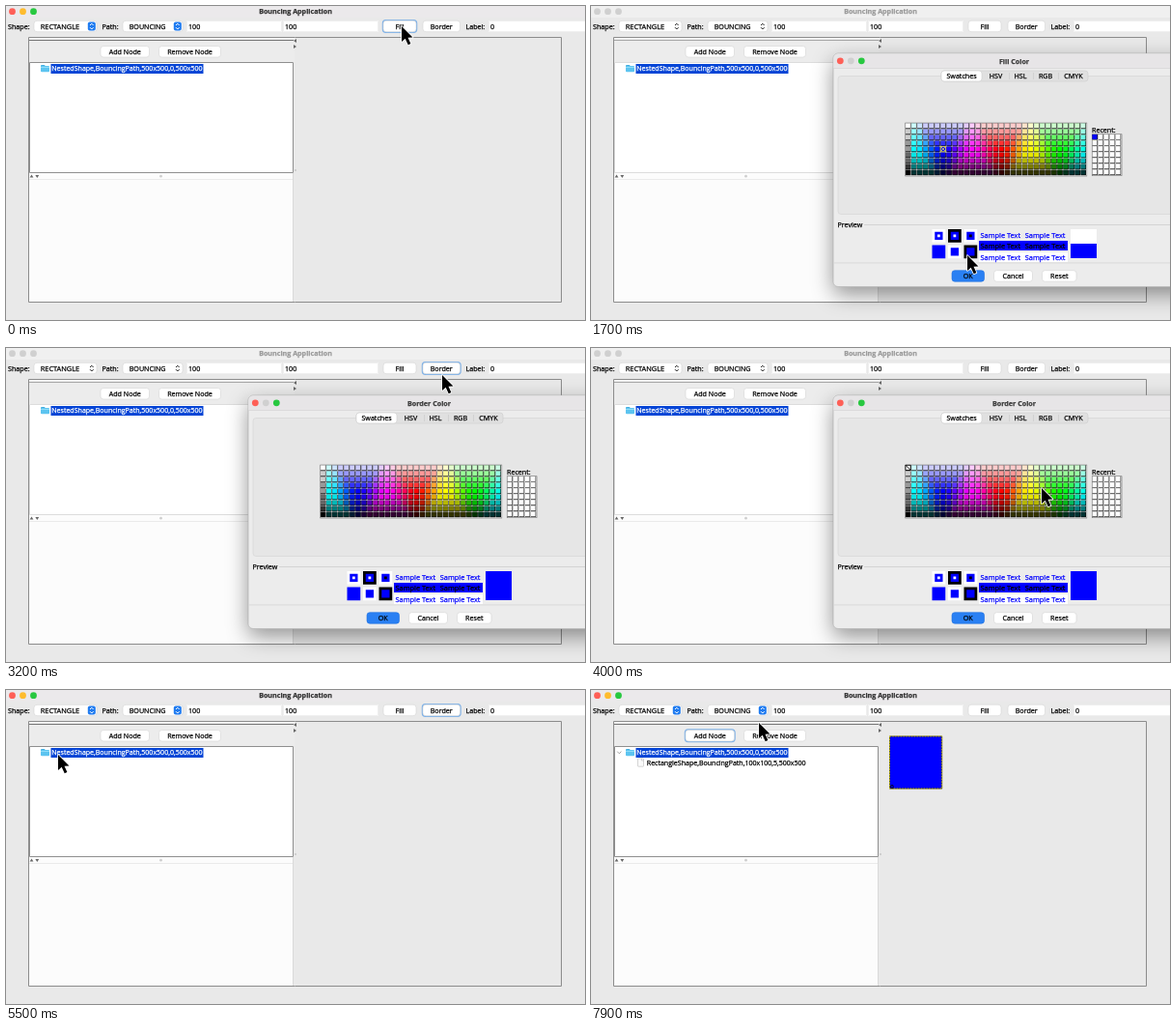
An HTML page with a canvas that plays this animation: 600x325 px, repeating every 8000 ms.

```html
<!DOCTYPE html>
<html lang="en">
<head>
<meta charset="utf-8">
<title>Bouncing Application</title>
<style>
html, body { margin: 0; width: 100%; height: 100%; overflow: hidden; background: #e9e9e9; }
canvas { display: block; width: 600px; height: 325px; }
</style>
</head>
<body>
<canvas id="stage" width="600" height="325"></canvas>
<script>
const ctx = document.getElementById('stage').getContext('2d');
const LOOP = 8000, STEP = 100;
const UI = 0.55; // interface units to stage pixels
const FILL_DIALOG = { title: 'Fill Color', open: 500, close: 2000, pick: 1200, old: '#fff', color: '#00f', cell: [6, 4] };
const BORDER_DIALOG = { title: 'Border Color', open: 3100, close: 4800, pick: 4300, old: '#00f', color: '#ff0', cell: [21, 4] };
const BORDER_CLICK = 2900, ADD_CLICK = 6200;

// Pointer stops: time, x, y
const POINTER = [
  [0, 410, 21], [700, 410, 21], [1150, 365, 149], [1300, 365, 149],
  [1700, 390, 258], [1800, 390, 275], [2000, 390, 278], [2600, 447, 46],
  [2800, 452, 28], [3600, 452, 28], [4000, 467, 145], [4200, 455, 148],
  [4300, 455, 148], [4500, 400, 262], [4700, 391, 284], [5300, 391, 284],
  [5500, 54, 67], [5600, 54, 67], [6000, 122, 46], [6250, 122, 46],
  [6500, 235, 71], [6900, 384, 110], [7050, 384, 112], [7400, 424, 81], [7900, 174, 34]
];

function rect(x, y, w, h, color) {
  ctx.fillStyle = color;
  ctx.fillRect(x, y, w, h);
}

function frame(x, y, w, h, color) {
  ctx.strokeStyle = color;
  ctx.lineWidth = 1;
  ctx.strokeRect(x + 0.5, y + 0.5, w - 1, h - 1);
}

function round(x, y, w, h, r, fill, stroke, width = 0.6) {
  ctx.beginPath();
  ctx.roundRect(x, y, w, h, r);
  if (fill) { ctx.fillStyle = fill; ctx.fill(); }
  if (stroke) { ctx.strokeStyle = stroke; ctx.lineWidth = width; ctx.stroke(); }
}

function dot(x, y, r, color) {
  ctx.fillStyle = color;
  ctx.beginPath();
  ctx.arc(x, y, r, 0, Math.PI * 2);
  ctx.fill();
}

function poly(points, fill) {
  ctx.beginPath();
  points.forEach(([x, y]) => ctx.lineTo(x, y));
  ctx.closePath();
  ctx.fillStyle = fill;
  ctx.fill();
}

function line(points, color, width) {
  ctx.beginPath();
  points.forEach(([x, y]) => ctx.lineTo(x, y));
  ctx.strokeStyle = color;
  ctx.lineWidth = width;
  ctx.stroke();
}

// y is the vertical middle of the line; a hairline stroke gives a medium weight
function text(str, x, y, { color = '#000', align = 'left', size = 7.15, bold = false } = {}) {
  ctx.font = `${bold ? 'bold ' : ''}${size}px "Open Sans", "Noto Sans", sans-serif`;
  ctx.fillStyle = ctx.strokeStyle = color;
  ctx.lineWidth = 0.25;
  ctx.lineJoin = 'round';
  ctx.textAlign = align;
  ctx.textBaseline = 'alphabetic';
  ctx.fillText(str, x, y + 2.6);
  ctx.strokeText(str, x, y + 2.6);
}

function button(label, x, y, w, { focused = false, primary = false } = {}) {
  if (focused) round(x - 0.3, y - 0.3, w + 0.6, 12.1, 3, null, '#7fb2e8', 1.9);
  round(x, y, w, 11.5, 3, primary ? '#2a80f3' : '#fff', primary ? '#1d6fe0' : '#d4d4d4');
  text(label, x + w / 2, y + 5.8, { align: 'center' });
}

function combo(label, x, w, active, size) {
  round(x, 15.3, w, 11.4, 3, '#fff', '#d4d4d4');
  text(label, x + 6.7, 21, { size });
  const cx = x + w - 5.2;
  if (active) round(cx - 4, 16.6, 8, 8.8, 2, '#1f7bf0');
  const arrow = active ? '#fff' : '#222';
  line([[cx - 1.8, 20], [cx, 18.2], [cx + 1.8, 20]], arrow, 1);
  line([[cx - 1.8, 22.2], [cx, 24], [cx + 1.8, 22.2]], arrow, 1);
}

function field(x, w, value) {
  rect(x, 15, w, 12, '#fff');
  frame(x, 15, w, 12, '#efefef');
  text(value, x + 2, 21);
}

function titleBar(active) {
  rect(0, 0, 600, 12, active ? '#ebe9eb' : '#f0f0f0');
  const lights = active ? ['#fe5f57', '#febc2e', '#28c840'] : ['#d0d0d0', '#d0d0d0', '#d0d0d0'];
  lights.forEach((color, i) => dot(6.5 + i * 11, 5.7, 3.4, color));
  text('Bouncing Application', 300, 5.8, { bold: true, align: 'center', color: active ? '#333' : '#9a9a9a' });
}

function toolbar(active, focus) {
  text('Shape:', 2, 21);
  combo('RECTANGLE', 29, 65, active, 7.4);
  text('Path:', 99.5, 21);
  combo('BOUNCING', 121, 62, active);
  field(187, 99, '100');
  field(287, 99, '100');
  button('Fill', 391, 15.2, 34, { focused: focus === 'fill' });
  button('Border', 432, 15.2, 38.5, { focused: focus === 'border' });
  text('Label:', 476.5, 21);
  field(500, 102, '0');
}

function tree(added, active) {
  rect(24, 58, 274, 115, '#fff');
  frame(24, 58, 274, 115, active ? '#8f8f8f' : '#dcdcdc');
  round(36, 61, 4.5, 3, 1, '#42aee0');
  round(36, 62, 9, 6.3, 1, '#5cc4f0');
  rect(36, 63, 9, 1, '#8fdcf8');
  rect(46.5, 60, 158, 10, '#0645d6');
  text('NestedShape,BouncingPath,500x500,0,500x500', 47.3, 64.7, { color: '#fff', size: 7.05 });
  if (!added) return;
  line([[27.2, 63.6], [29.3, 65.8], [31.4, 63.6]], '#8a8a8a', 0.8);
  round(48.5, 70.8, 6, 8.4, 0.5, '#fafafa', '#b9b9b9');
  line([[52.4, 70.8], [52.4, 73], [54.5, 73]], '#b9b9b9', 0.6);
  text('RectangleShape,BouncingPath,100x100,5,500x500', 57.8, 75, { size: 7.05 });
}

function bouncingShape(t) {
  const x = 305 + (t - 6900) * 0.0045, y = 39 + (t - 6900) * 0.0089;
  const size = 100 * UI - 0.8;
  rect(x, y, size, size, '#00f');
  ctx.lineWidth = 0.8;
  ctx.strokeStyle = '#44420a';
  ctx.strokeRect(x, y, size, size);
  ctx.setLineDash([1.4, 1.4]);
  ctx.strokeStyle = '#e6d800';
  ctx.strokeRect(x, y, size, size);
  ctx.setLineDash([]);
  text('0', x + 0.7, y + size - 2.6, { size: 6 });
}

function workspace(t, focus, active) {
  const added = t >= ADD_CLICK;
  frame(23, 32, 553, 275, '#8c8c8c');
  rect(24, 33, 275, 25, '#ececec');
  rect(24, 33, 275, 1, '#f8f8f8');
  rect(24, 35, 274, 1, active ? '#777' : '#a8a8a8');
  button('Add Node', 98, 41.5, 50.5, { focused: focus === 'add' });
  button('Remove Node', 158.5, 41.5, 64);
  tree(added, active);
  rect(24, 173, 274, 133, '#fcfcfc');
  rect(24, 179, 274, 0.8, '#e6e6e6');
  rect(297, 173, 1, 133, '#dadada');
  const gray = '#666';
  poly([[24.6, 177.5], [28.4, 177.5], [26.5, 174.6]], gray);
  poly([[30.4, 175], [34.2, 175], [32.3, 177.9]], gray);
  poly([[301, 34], [301, 38], [298, 36]], gray);
  poly([[298, 40], [298, 44], [301, 42]], gray);
  dot(160.5, 176.2, 1.4, '#cfcfcf');
  dot(300, 170, 0.9, '#c4c4c4');
  if (added) bouncingShape(t);
}

function swatchColor(col, row) {
  if (col === 0) {
    const g = [255, 204, 204, 153, 153, 102, 102, 51, 0][row];
    return `rgb(${g},${g},${g})`;
  }
  const hue = (14 + col) % 30; // five steps per sixth of the wheel
  const depth = Math.max(0, row - 4) / 4;
  const ceiling = 255 - 204 * depth ** 1.5;
  const channel = centre => {
    const gap = Math.abs(hue - centre);
    const level = Math.max(0, Math.min(1, 2 - Math.min(gap, 30 - gap) / 5));
    const base = 255 * level * level * (3 - 2 * level);
    return Math.round(row < 4 ? Math.max(base, 204 - 51 * row) : Math.min(base, ceiling));
  };
  return `rgb(${channel(0)},${channel(10)},${channel(20)})`;
}

function swatchGrid(x, y, cols, rows, colorAt) {
  ctx.save();
  ctx.translate(x, y);
  ctx.scale(UI, UI);
  rect(-1, -1, cols * 11 + 2, rows * 11 + 2, '#666');
  rect(0, 0, cols * 11, rows * 11, '#fff');
  for (let row = 0; row < rows; row++) {
    for (let col = 0; col < cols; col++) {
      rect(col * 11, row * 11, 10, 10, '#000');
      rect(col * 11, row * 11, 9, 9, colorAt(col, row));
    }
  }
  ctx.restore();
}

function marker(col, row) {
  const x = 326 + col * 11 * UI, y = 121.3 + row * 11 * UI;
  const ink = row ? '#e8e060' : '#000';
  ctx.strokeStyle = ink;
  ctx.lineWidth = 0.8;
  ctx.strokeRect(x, y, 5.2, 5.2);
  line([[x, y], [x + 5, y + 5]], ink, 0.9);
  if (row) line([[x + 5, y], [x, y + 5]], ink, 0.9);
}

function preview(old, color) {
  ctx.save();
  ctx.translate(353.5, 231);
  ctx.scale(UI, UI);
  const nested = (col, row, ...colors) => colors.forEach((c, i) =>
    rect(col * 30 + i * 5, row * 30 + i * 5, 25 - i * 10, 25 - i * 10, c));
  nested(0, 0, '#fff', color, '#fff');
  nested(1, 0, '#000', color, '#fff');
  nested(2, 0, '#fff', color, '#000');
  nested(0, 1, color);
  nested(1, 1, '#fff', color);
  nested(2, 1, '#000', color);
  ctx.restore();

  rect(402, 243, 92, 10, color);
  rect(402, 255, 92, 10, '#fff');
  for (let row = 0; row < 3; row++) {
    for (let col = 0; col < 2; col++) {
      text('Sample Text', 403.5 + col * 46.3, 237.3 + row * 11.4,
        { color: row === 1 ? '#000' : color, size: 7.4 });
    }
  }
  rect(497, 231, 27, 15, old);
  rect(497, 246, 27, 15, color);
}

function dialog({ title, open, pick, old, color, cell }, t) {
  const picked = t >= pick;
  ctx.save();
  ctx.shadowColor = 'rgba(0,0,0,0.42)';
  ctx.shadowBlur = 22;
  ctx.shadowOffsetY = 8;
  round(251, 49, 375, 241.5, 5, '#ececec');
  ctx.restore();
  round(251, 49, 375, 241.5, 5, '#ececec', '#a9a9a9');
  round(251.4, 49.4, 374, 15, [5, 5, 0, 0], '#e7e5e7');
  rect(251, 64, 375, 0.6, '#d2d2d2');
  ['#fe5f57', '#d0d0d0', '#28c840'].forEach((c, i) => dot(258.3 + i * 11, 56.8, 3.4, c));
  text(title, 438.5, 57, { bold: true, align: 'center', color: '#3a3a3a' });

  round(256, 72.5, 365, 143, 3, '#e6e6e6', '#d4d4d4');
  round(363, 67, 152, 11, 3, '#e0e0e0', '#cdcdcd');
  round(363, 67, 42, 11, 3, '#fff', '#cdcdcd');
  [['Swatches', 384], ['HSV', 419.5], ['HSL', 445], ['RGB', 471], ['CMYK', 500]]
    .forEach(([label, x]) => text(label, x, 72.5, { align: 'center' }));
  [433, 458, 484].forEach(x => rect(x, 69, 0.6, 7, '#c8c8c8'));

  swatchGrid(326, 121.3, 31, 9, swatchColor);
  if (t > open + STEP) {
    if (picked) marker(...cell);
    else marker(0, 0);
  }
  text('Recent:', 519, 128.3);
  swatchGrid(519.5, 133, 5, 7, (col, row) => picked && col + row === 0 ? color : '#fff');

  text('Preview', 255.5, 226);
  rect(283, 226, 320, 1, '#d4d4d4');
  rect(251.5, 265.6, 350, 0.7, '#cfcfcf');
  preview(old, picked ? color : old);
  button('OK', 374, 273.7, 33.5, { primary: true });
  button('Cancel', 417.5, 273.7, 40);
  button('Reset', 467.5, 273.7, 35.5);
}

function pointer(t) {
  let i = POINTER.findIndex(stop => stop[0] > t);
  if (i < 0) i = POINTER.length - 1;
  const [t0, x0, y0] = POINTER[i - 1], [t1, x1, y1] = POINTER[i];
  const k = Math.min(1, (t - t0) / (t1 - t0));
  ctx.save();
  ctx.translate(x0 + (x1 - x0) * k, y0 + (y1 - y0) * k);
  ctx.beginPath();
  [[0, 0], [0, 16], [3.7, 12.7], [6.7, 19.2], [9.4, 18], [6.5, 11.8], [11.5, 11.6]]
    .forEach(([x, y]) => ctx.lineTo(x, y));
  ctx.closePath();
  ctx.lineJoin = 'round';
  ctx.strokeStyle = '#fff';
  ctx.lineWidth = 1.6;
  ctx.stroke();
  ctx.fillStyle = '#000';
  ctx.fill();
  ctx.restore();
}

function focusAt(t, current) {
  if (current && t > current.open + STEP) return null;
  if (t >= ADD_CLICK) return 'add';
  return t >= BORDER_CLICK ? 'border' : 'fill';
}

function draw(t) {
  const current = [FILL_DIALOG, BORDER_DIALOG].find(d => t >= d.open && t < d.close);
  const focus = focusAt(t, current);
  rect(0, 0, 600, 325, '#e9e9e9');
  titleBar(!current);
  toolbar(!current, focus);
  workspace(t, focus, !current);
  if (current) dialog(current, t);
  pointer(t);
}

const start = performance.now();
function tick() {
  const t = (performance.now() - start) % LOOP;
  draw(Math.floor(t / STEP) * STEP);
  requestAnimationFrame(tick);
}
tick();
</script>
</body>
</html>
```
